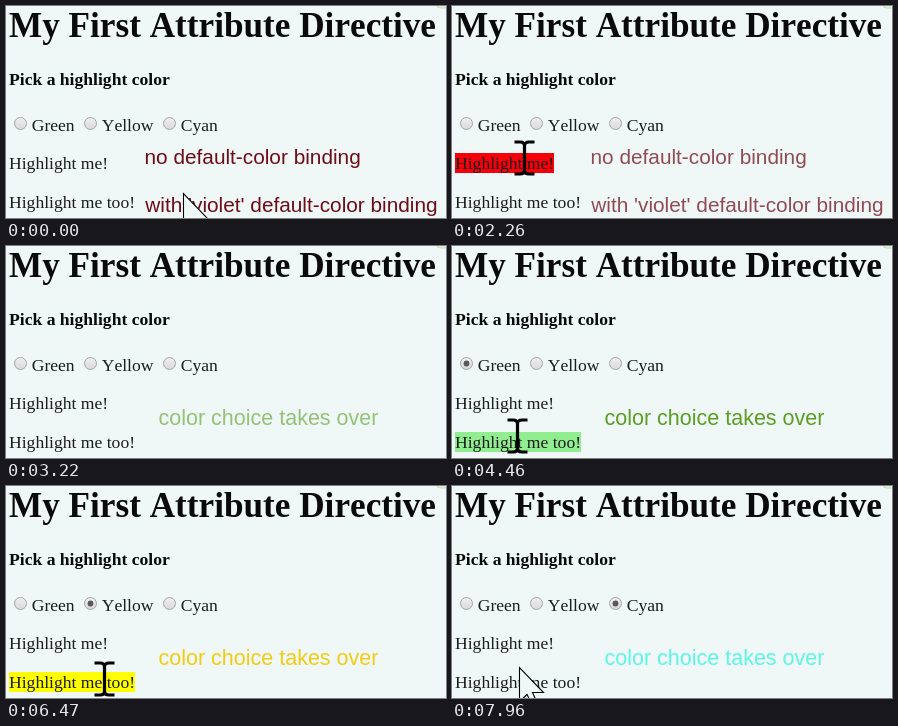
Write an HTML page that moves like this. It is 440 px wide and 212 px high and loops after 7990 ms.

```html
<!DOCTYPE html>
<html lang="en">
<head>
<meta charset="utf-8">
<title>Attribute directive</title>
<style>
  html, body { margin: 0; width: 100%; height: 100%; overflow: hidden; background: #eff8f7; }
  svg { display: block; width: 440px; height: 212px; font-kerning: none; }
  .page { font: 17.6px "Liberation Serif", "Times New Roman", serif; fill: #1c1c1c; font-kerning: none; }
  .page .bold { font-weight: bold; fill: #0a0a0a; }
  .page .title { font-size: 35.2px; }
  .note { font: 20.8px "Liberation Sans", Arial, sans-serif; font-kerning: none; }
  .choice { font-size: 21.5px; }
</style>
</head>
<body>
<svg viewBox="0 0 440 212">
  <defs>
    <linearGradient id="knob" x1="0" y1="0" x2="0" y2="1">
      <stop offset="0" stop-color="#f0f0f0"/>
      <stop offset="1" stop-color="#d8d8d8"/>
    </linearGradient>
  </defs>
  <rect width="440" height="212" fill="#eff8f7"/>
  <rect x="430.5" y="-20" width="30" height="22" rx="4" fill="#e2eed8" stroke="#c6d6b8"/>
  <g id="marks"></g>
  <g class="page">
    <text class="bold title" x="3" y="31">My First Attribute Directive</text>
    <text class="bold" x="3" y="79">Pick a highlight color</text>
    <g id="radios"></g>
    <text x="3" y="163">Highlight me!</text>
    <text x="3" y="202">Highlight me too!</text>
  </g>
  <g id="binding" class="note" fill="#6e0c18">
    <text x="138.5" y="158">no default-color binding</text>
    <text x="139.3" y="206">with 'violet' default-color binding</text>
  </g>
  <g id="choices" class="note choice"></g>
  <path id="arrow" d="M.5 .5V34.5L8 27.5L13.5 38.5L18.5 36.5L13.5 25.5H24.5Z"
        fill="#f1f8f8" stroke="#000" stroke-width="1.1"/>
  <path id="beam" d="M-9.5 -16H-4Q.5 -16 .5 -12Q.5 -16 5 -16H10.5M.5 -13V13M-9.5 16H-4Q.5 16 .5 12Q.5 16 5 16H10.5"
        fill="none" stroke="#000" stroke-width="3.2"/>
</svg>
<script>
const LOOP = 7990;
const FADE = 450;
const byId = id => document.getElementById(id);
const mix = (a, b, k) => a + (b - a) * k;
const ramp = (t, from, length) => Math.max(0, Math.min(1, (t - from) / length));
const ease = k => k * k * (3 - 2 * k);

// Each option is picked and its caption appears at these times.
const options = [
  { label: "Green", x: 14.5, pickAt: 3600, captionAt: 2950, ink: "#5a9e23", mark: "#90ee90" },
  { label: "Yellow", x: 84.5, pickAt: 5350, captionAt: 4740, ink: "#f0cc12", mark: "#ffff00" },
  { label: "Cyan", x: 163.5, pickAt: 7040, captionAt: 6720, ink: "#5cf5e6", mark: "#00ffff" }
];

const lines = [
  { width: 99, top: 147, mark: "#f6000a" },
  { width: 126, top: 186, mark: "#ee82ee" }
];
const LEFT = 3, HEIGHT = 20;

// The pointer rests between moves.
const home = { x: 177, y: 187 };
const moves = [
  { from: 430, to: 1050, x: 85, y: 190 },
  { from: 1510, to: 1780, x: 71, y: 156 },
  { from: 2140, to: 2890, x: 82, y: 99 },
  { from: 2950, to: 3170, x: 445, y: -45 },
  { from: 3250, to: 3560, x: 14, y: 117 },
  { from: 3620, to: 4460, x: 65, y: 190 },
  { from: 4620, to: 5190, x: 89, y: 112 },
  { from: 5400, to: 6470, x: 98, y: 193 },
  { from: 6500, to: 6950, x: 163, y: 110 },
  { from: 7060, to: 7550, x: 60, y: 164 },
  { from: 7780, to: 7960, x: 67, y: 181 }
];

byId("radios").innerHTML = options.map(o => `
  <circle cx="${o.x}" cy="117.5" r="6" fill="url(#knob)" stroke="#a5a5a5"/>
  <circle class="dot" cx="${o.x}" cy="117.5" r="2.9" fill="#585858"/>
  <text x="${o.x + 11.2}" y="125">${o.label}</text>`).join("");
byId("choices").innerHTML = options.map(o =>
  `<text x="152.5" y="179" fill="${o.ink}">color choice takes over</text>`).join("");
byId("marks").innerHTML = lines.map(l =>
  `<rect x="${LEFT}" y="${l.top}" width="${l.width}" height="${HEIGHT}"/>`).join("");

const dots = document.querySelectorAll(".dot");
const marks = byId("marks").children;
const captions = byId("choices").children;
const show = (node, on) => node.setAttribute("visibility", on ? "visible" : "hidden");

function pointerAt(t) {
  let { x, y } = home;
  for (const m of moves) {
    const k = ease(ramp(t, m.from, m.to - m.from));
    x = mix(x, m.x, k);
    y = mix(y, m.y, k);
  }
  return { x: Math.round(x), y: Math.round(y) };
}

function isOver(line, { x, y }) {
  return x >= LEFT && x < LEFT + line.width && y >= line.top && y < line.top + HEIGHT;
}

function captionOpacity(t, i) {
  const next = options[i + 1];
  const fadeOut = next ? ramp(t, next.captionAt - FADE / 2, FADE) : 0;
  return ramp(t, options[i].captionAt, FADE) * (1 - fadeOut);
}

function draw(t) {
  const pointer = pointerAt(t);
  const picked = options.filter(o => t >= o.pickAt).pop();
  const hovered = lines.find(l => isOver(l, pointer));

  options.forEach((o, i) => {
    show(dots[i], o === picked);
    captions[i].setAttribute("opacity", captionOpacity(t, i));
  });
  lines.forEach((l, i) => {
    show(marks[i], l === hovered);
    marks[i].setAttribute("fill", (picked || l).mark);
  });
  byId("binding").setAttribute("opacity", 1 - ramp(t, 2140, FADE));

  show(byId("arrow"), !hovered);
  show(byId("beam"), hovered);
  for (const id of ["arrow", "beam"]) {
    byId(id).setAttribute("transform", `translate(${pointer.x} ${pointer.y})`);
  }
}

const start = performance.now();
function tick() {
  draw((performance.now() - start) % LOOP);
  requestAnimationFrame(tick);
}
tick();
</script>
</body>
</html>
```
